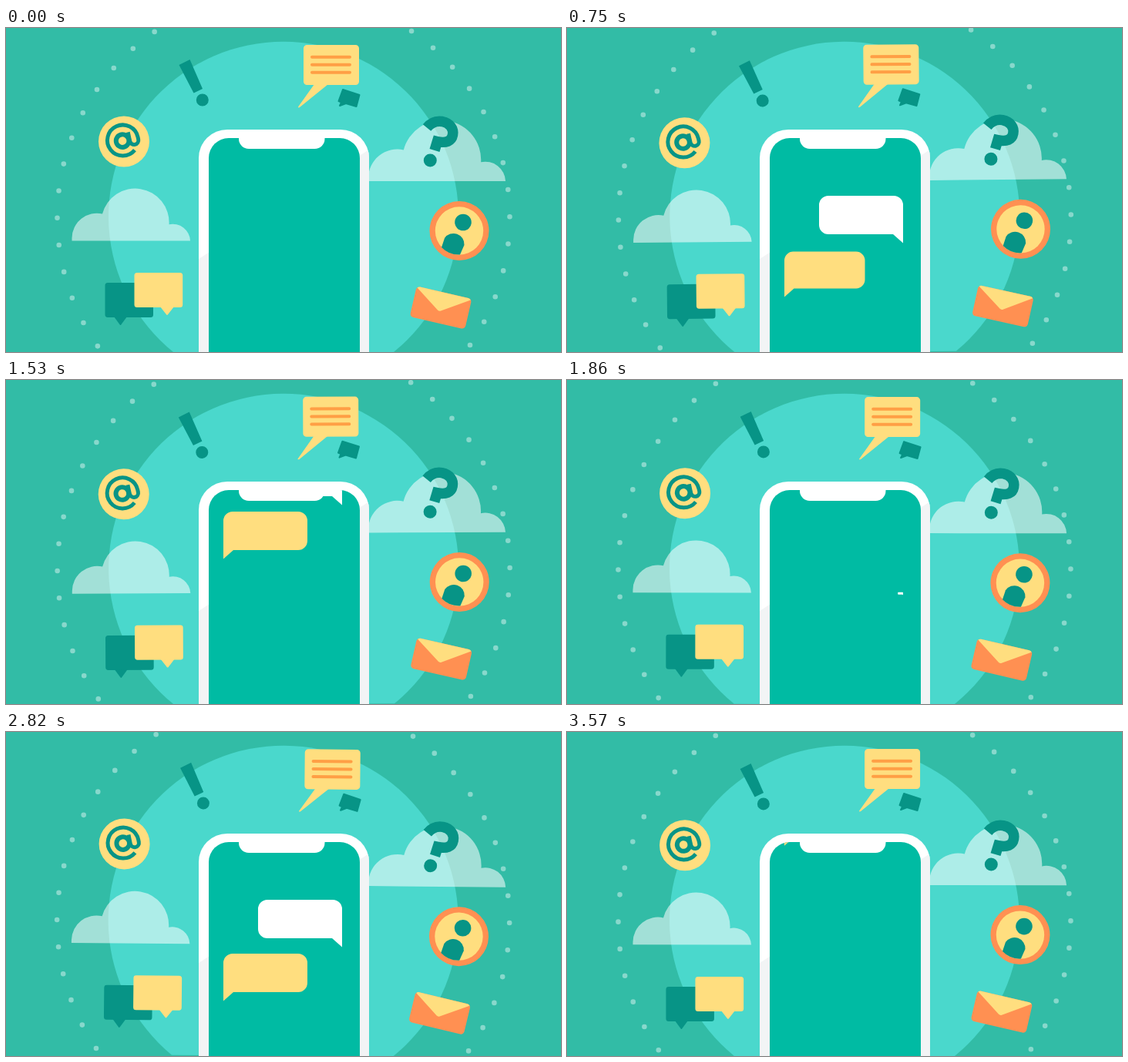
Recreate the animation shown at these times as an HTML page. Size 720x421 px, loop 3.6 s.

```html
<!DOCTYPE html>
<html lang="en">
<head>
<meta charset="utf-8">
<title>Chat on a phone</title>
<style>
  html, body { margin: 0; width: 100%; height: 100%; overflow: hidden; background: #32bca6; }
  svg { display: block; width: 720px; height: 421px; }
  .dark { fill: #079486; }
  .yellow { fill: #ffde7f; }
  .orange { fill: #ff9052; }
  .white { fill: #fff; }
  .ink { fill: none; stroke: #079486; }
</style>
</head>
<body>
<svg viewBox="0 0 720 421">
  <defs>
    <path id="cloud" d="M0 0V-3.5A32.5 32.5 0 0 1 39.5 -35A44 44 0 0 1 126 -21.3A22.7 22.7 0 0 1 153.5 0Z" fill="#fff" fill-opacity=".55"/>
    <!-- Chat bubble with the tip of its tail at the origin -->
    <path id="bubble" d="M-13 -11.5H-97a12 12 0 0 1 -12 -12v-26a12 12 0 0 1 12 -12h85a12 12 0 0 1 12 12V0Z"/>
    <clipPath id="screen"><path d="M263 421V169a26 26 0 0 1 26 -26H433a26 26 0 0 1 26 26V421Z"/></clipPath>
    <clipPath id="phone"><path d="M250 421V169a37 37 0 0 1 37 -37H434a37 37 0 0 1 37 37V421Z"/></clipPath>
  </defs>

  <g id="scene">
    <path d="M217 421A227 227 0 1 1 503 421Z" fill="#4ad8cc"/>
    <circle cx="360" cy="246" r="293.5" transform="rotate(-.15 360 246)" pathLength="52" fill="none"
      stroke="#fff" stroke-opacity=".42" stroke-width="6.6" stroke-linecap="round" stroke-dasharray="0 1"/>
    <use href="#cloud" x="85.5" y="276.5"/>
    <use href="#cloud" transform="translate(470 199) scale(1.16)"/>

    <g id="at">
      <circle class="yellow" cx="153" cy="147.4" r="33"/>
      <g class="ink" transform="rotate(-12 151.5 146)">
        <circle cx="151" cy="146.5" r="8.3" stroke-width="6"/>
        <path d="M164 161.6A20 20 0 1 1 171.5 146V149a5.6 5.6 0 0 1 -11.2 0V137" stroke-width="5"/>
      </g>
    </g>

    <g id="exclamation" class="dark">
      <path d="M224.5 48L238.5 41L255 79L243.5 84.5Z"/>
      <circle cx="254.8" cy="93.5" r="8"/>
    </g>

    <g id="note">
      <path class="yellow" d="M400 73L379 102.5Q379 104 381 103L418 73Z"/>
      <rect class="yellow" x="386" y="22" width="72" height="52" rx="4.5"/>
      <path d="M397 37.7h49M397 47.7h49M397 57.7h49" stroke="#ff9f45" stroke-width="4" stroke-linecap="round"/>
      <path class="dark" d="M437 80L458.5 87L454.5 102L441 98L433 101L435 96.5L431.5 95Z"
        stroke="#079486" stroke-width="2" stroke-linejoin="round"/>
    </g>

    <g id="question">
      <path class="ink" d="M546 129.5C553 121 560 120.5 566 121.5C576 123.5 581 131 579.5 139C578 147 571 150 559.5 147.5L556 159" stroke-width="13.5"/>
      <circle class="dark" cx="550.3" cy="172" r="8.5"/>
    </g>

    <g id="contact">
      <circle class="orange" cx="588" cy="263.5" r="38.5"/>
      <circle class="yellow" cx="588" cy="263.5" r="31.2"/>
      <circle class="dark" cx="593" cy="252.5" r="10.8"/>
      <path class="dark" d="M565 285L569 273A14 14 0 0 1 594.5 282L589 294.5A31 31 0 0 1 565 285Z"/>
    </g>

    <g id="envelope" transform="translate(564 363.5) rotate(13)">
      <rect class="orange" x="-36.7" y="-20.2" width="73.4" height="40.4" rx="4.5"/>
      <path class="yellow" d="M-35.5 -18.5Q-34.5 -20.2 -32 -20.2H32Q34.5 -20.2 35.5 -18.5L1 4Q-1 5.2 -3 4Z"/>
    </g>

    <g id="talk">
      <path class="dark" d="M140 375L147.7 385.5Q148.5 386.5 149.3 385.5L157 375Z"/>
      <rect class="dark" x="128.5" y="331" width="62.5" height="45" rx="3.5"/>
      <path class="yellow" d="M200 362L208.2 372.5Q209 373.3 209.8 372.5L218 362Z"/>
      <rect class="yellow" x="166.5" y="318" width="62.7" height="45" rx="3.5"/>
    </g>
  </g>

  <g clip-path="url(#phone)">
    <path class="white" d="M250 132H471V421H250Z"/>
    <path d="M250 300L471 158V421H250Z" fill="#f2f4f5"/>
  </g>
  <g clip-path="url(#screen)">
    <path d="M263 143H459V421H263Z" fill="#00bba3"/>
    <use id="sent" class="white" href="#bubble"/>
    <use id="reply" class="yellow" href="#bubble"/>
  </g>
  <path class="white" d="M302 141V144a13 13 0 0 0 13 13H400.5a13 13 0 0 0 13 -13V141Z"/>
</svg>
<script>
  const LOOP = 3600, CHAT = 1800, SWAY = 0.555, SCROLL = 212;
  const [scene, sent, reply] = ['scene', 'sent', 'reply'].map(id => document.getElementById(id));

  const progress = (t, from, to) => Math.min(1, Math.max(0, (t - from) / (to - from)));
  const ease = p => p * p * (3 - 2 * p);

  function place(el, x, y, size, side) {
    el.setAttribute('transform', `translate(${x} ${y}) scale(${side * size} ${size})`);
  }

  function draw(now) {
    const angle = -SWAY * Math.sin(now / LOOP * 2 * Math.PI);
    scene.setAttribute('transform', `rotate(${angle} 360 210.5)`);

    const t = now % CHAT;
    const lift = SCROLL * progress(t, 1200, 1800);
    place(sent, 436, 279.5 - lift, ease(progress(t, 0, 400)), 1);
    place(reply, 282, 349.5 - lift, ease(progress(t, 400, 800)), -1);
  }

  const start = performance.now();
  function tick() {
    draw((performance.now() - start) % LOOP);
    requestAnimationFrame(tick);
  }
  tick();
</script>
</body>
</html>
```
